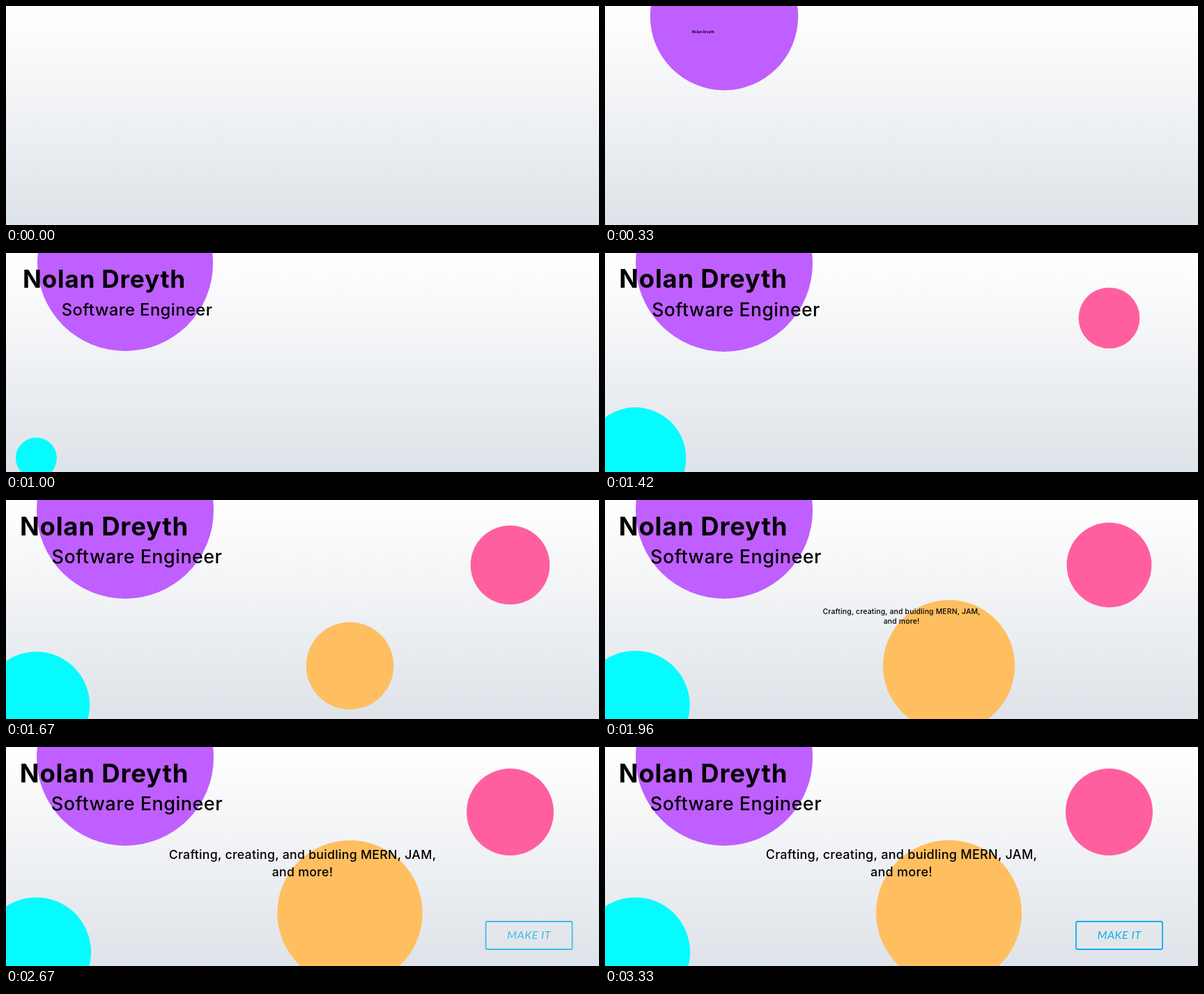
Recreate the animation shown at these times as an HTML page. Size 851 px wide and 315 px high, loop 5 s.

```html
<!DOCTYPE html>
<html lang="en">
<head>
<meta charset="utf-8">
<title>Profile banner</title>
<style>
  html, body { margin: 0; width: 100%; height: 100%; overflow: hidden; }
  svg { display: block; width: 851px; height: 315px; font-family: Inter, "Open Sans", sans-serif; font-weight: 500; text-anchor: middle; }
  #name { font-size: 36.5px; font-weight: 700; letter-spacing: .8px; }
  #role { font-size: 27px; letter-spacing: .5px; }
  #pitch { font-size: 18px; letter-spacing: .28px; }
  #button text { font: italic 400 16.3px Lato, sans-serif; letter-spacing: .4px; fill: #10aeea; }
</style>
</head>
<body>
<svg viewBox="0 0 851 315">
  <defs>
    <linearGradient id="sky" x2="0" y2="1">
      <stop stop-color="#fff"/>
      <stop offset=".08" stop-color="#fdfdfd"/>
      <stop offset="1" stop-color="#dee3e9"/>
    </linearGradient>
  </defs>
  <rect width="851" height="315" fill="url(#sky)"/>
  <g id="purple"><circle r="127" fill="#bf5fff"/></g>
  <g id="cyan"><circle r="78.7" fill="#06fbff"/></g>
  <g id="pink"><circle r="62.5" fill="#ff5f9e"/></g>
  <g id="orange"><circle r="104.5" fill="#ffbf60"/></g>
  <g id="name"><text y="13.5">Nolan Dreyth</text></g>
  <g id="role"><text y="10">Software Engineer</text></g>
  <g id="pitch">
    <text y="-6.5">Crafting, creating, and buidling MERN, JAM,</text>
    <text y="18.5">and more!</text>
  </g>
  <g id="button">
    <rect x="676" y="251" width="124" height="40" rx="2" fill="none" stroke="#10aeea" stroke-width="1.8"/>
    <text x="738" y="276">MAKE IT</text>
  </g>
</svg>
<script>
const LOOP = 5000, FPS = 24, STAGGER = 0.3;
const $ = id => document.getElementById(id);

// Elements that grow from their centre, in order of entry: id, x, y
const pops = [
  ['purple', 171, 15], ['name', 141, 37], ['role', 188, 81], ['cyan', 43.4, 295],
  ['pink', 723.5, 93.5], ['orange', 493.5, 238.5], ['pitch', 425.5, 167.5]
].map(([id, x, y], i) => ({ el: $(id), x, y, start: i * STAGGER }));

const button = { el: $('button'), start: pops.length * STAGGER, length: 1.23, shift: 52 };

// Decay exponent over seconds; the growth is 1 - exp(-exponent)
const decay = [[0, 0], [.025, .1], [.1, .47], [.16, .88], [.22, 1.23], [.325, 1.77],
  [.4, 2.12], [.52, 2.62], [.625, 3.02], [.82, 3.95], [1.06, 5.2], [1.5, 8]];

function grow(s) {
  if (s <= 0) return 0;
  const i = decay.findIndex(p => p[0] >= s);
  if (i < 0) return 1;
  const [x0, y0] = decay[i - 1], [x1, y1] = decay[i];
  return 1 - Math.exp(-(y0 + (y1 - y0) * (s - x0) / (x1 - x0)));
}

function place(el, visible, transform) {
  el.setAttribute('visibility', visible ? 'visible' : 'hidden');
  el.setAttribute('transform', transform);
}

function draw(ms) {
  // Step at the film rate; 5 ms absorbs rounded frame times
  const t = Math.floor((ms % LOOP + 5) * FPS / 1000) / FPS;
  for (const { el, x, y, start } of pops) {
    const k = grow(t - start);
    place(el, k > 0, `translate(${x} ${y}) scale(${k})`);
  }
  const u = Math.min(1, Math.max(0, (t - button.start) / button.length));
  const rest = (1 - u) ** 2.3;
  place(button.el, u > 0, `translate(${button.shift * rest} 0)`);
  button.el.setAttribute('opacity', 1 - rest);
}

const origin = performance.now();
function tick() {
  draw(performance.now() - origin);
  requestAnimationFrame(tick);
}
tick();
</script>
</body>
</html>
```
